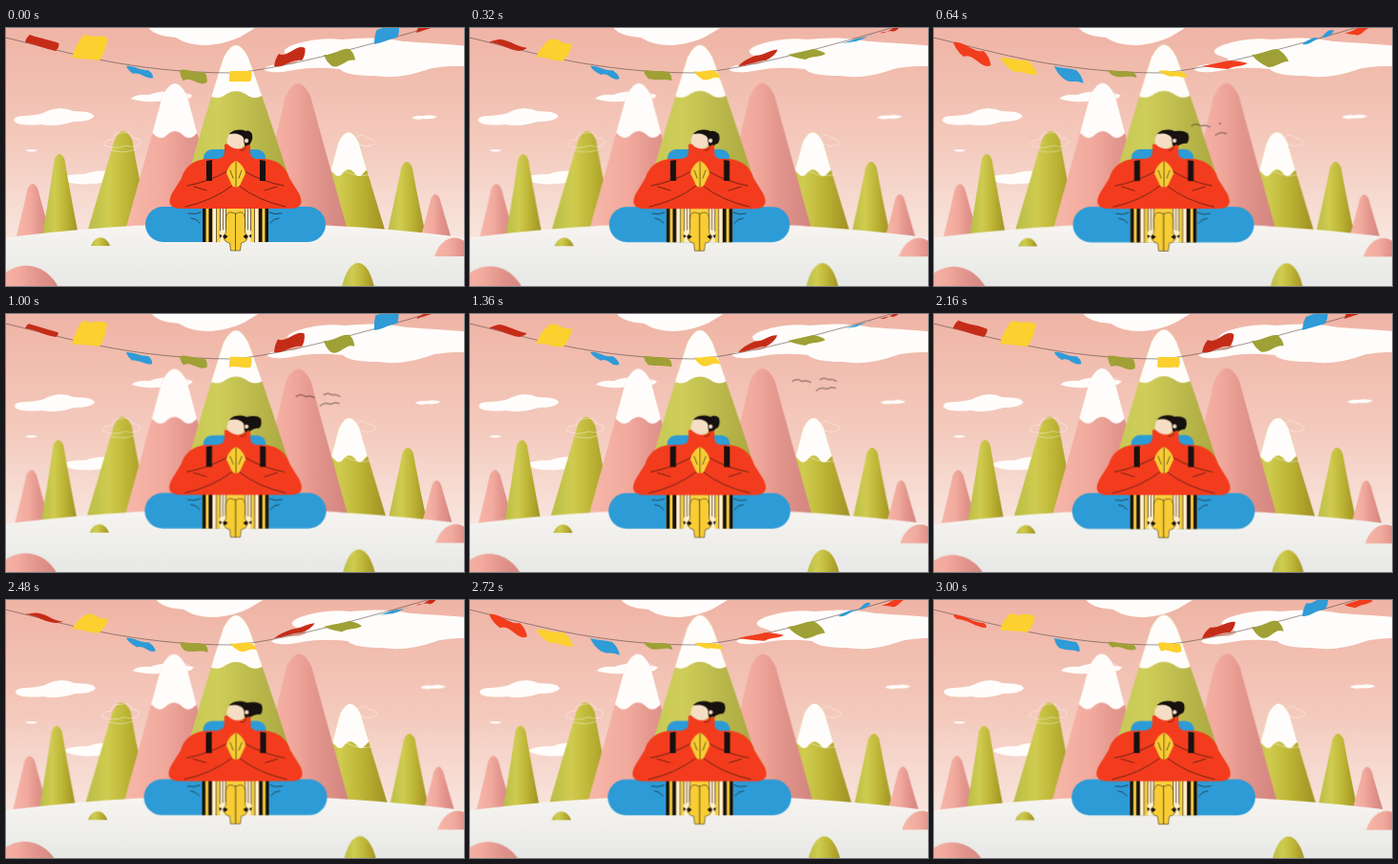
Animation, 480 px wide and 270 px high, one loop 3040 ms. Source, as an HTML page:

```html
<!DOCTYPE html>
<html lang="en">
<head>
<meta charset="utf-8">
<title>Mountain meditation</title>
<style>
  html, body { margin: 0; width: 100%; height: 100%; overflow: hidden; background: #f4cabd; }
  svg { display: block; width: 100vw; height: 100vh; }
  .zoom, .drift, .wind, .wind path { animation: 3040ms linear infinite both; }
  .zoom { animation-name: zoom; transform-origin: 240px 150px; }
  .drift { animation-name: drift; }
  .wind { animation-name: wind; }
  .wind path { animation-name: streak; animation-delay: var(--late, 0ms); }
  @keyframes zoom { to { transform: scale(1.019); } }
  @keyframes drift { to { transform: translate(var(--dx), var(--dy, 0px)); } }
  @keyframes wind {
    from { transform: translate(-128px, 60px); }
    to { transform: translate(159px, -75px); }
  }
  /* Each streak draws itself in, travels, then shortens towards its tip. */
  @keyframes streak {
    0%, 17% { stroke-dasharray: 0 2; stroke-dashoffset: 0; visibility: hidden; }
    17.1% { visibility: visible; }
    20.5%, 49% { stroke-dasharray: 1 2; stroke-dashoffset: 0; visibility: visible; }
    53.5% { stroke-dasharray: 1 2; stroke-dashoffset: -1; visibility: visible; }
    53.6%, 100% { stroke-dasharray: 0 2; stroke-dashoffset: 0; visibility: hidden; }
  }
  .ink { fill: none; stroke: #1b1413; stroke-width: .6; stroke-linecap: round; stroke-linejoin: round; }
  .wind { stroke-linecap: butt; }
  .mist { fill: none; stroke: #fff; stroke-width: .7; opacity: .6; }
  .cloud { fill: #fffdfb; }
</style>
</head>
<body>
<svg viewBox="0 0 480 270" preserveAspectRatio="none">
  <defs>
    <linearGradient id="sky" x2="0" y2="1">
      <stop stop-color="#efb4a5"/><stop offset=".45" stop-color="#f4cabd"/><stop offset=".8" stop-color="#f8e4dc"/>
    </linearGradient>
    <linearGradient id="green">
      <stop stop-color="#b9bd47"/><stop offset=".35" stop-color="#d0cc50"/>
      <stop offset=".65" stop-color="#bcb435"/><stop offset="1" stop-color="#a08f22"/>
    </linearGradient>
    <linearGradient id="pale">
      <stop stop-color="#c3c654"/><stop offset=".35" stop-color="#cfce5a"/>
      <stop offset=".65" stop-color="#b9b74a"/><stop offset="1" stop-color="#a3a03c"/>
    </linearGradient>
    <linearGradient id="pink">
      <stop stop-color="#f6b8a9"/><stop offset=".4" stop-color="#f2aa9e"/>
      <stop offset=".65" stop-color="#e3968d"/><stop offset="1" stop-color="#d2857f"/>
    </linearGradient>
    <linearGradient id="snow" x2="0" y2="1">
      <stop stop-color="#f8f5f2"/><stop offset=".35" stop-color="#f0efec"/><stop offset=".8" stop-color="#e6e8e5"/>
    </linearGradient>
  </defs>

  <rect width="480" height="270" fill="url(#sky)"/>

  <g class="cloud">
    <path class="drift" style="--dx:10px" d="M148-3Q152 8 178 10Q192 19 212 18Q232 16 246 9L266-3Z"/>
    <path class="drift" style="--dx:10px" d="M270 43Q276 37 298 38Q314 34 300 30Q283 25 300 18Q326 9 352 12Q388 8 416 14Q450 16 500 20V40Q452 39 440 44Q412 54 386 50Q356 50 350 43Q322 40 302 44Q276 49 270 43Z"/>
    <path class="drift" style="--dx:2px" d="M9 98Q6 92 20 92Q38 91 43 87Q57 81 70 87Q92 87 92 93Q88 98 71 98Q52 104 37 101Q14 103 9 98Z"/>
    <path class="drift" style="--dx:5px" d="M57 158Q60 153 82 153Q94 148 108 150V161Q70 167 57 158Z"/>
    <path class="drift" style="--dx:2px" d="M131 74Q136 69 150 70Q160 65 177 67L195 70Q192 77 171 76Q144 79 131 74Z"/>
    <path d="M20 128Q27 126 33 128Q27 131 20 128Z"/>
    <path class="drift" style="--dx:11px;--dy:-3px" d="M425 94Q430 91 437 92Q446 90 452 93Q447 96 438 95Q430 97 425 94Z"/>
  </g>

  <g class="zoom">
    <g id="range"></g>

    <g class="mist">
      <path d="M102 122Q104 116 112 117Q113 109 121 110Q132 107 133 115Q142 115 141 121Q136 126 126 123Q112 128 102 122M110 128Q123 132 135 127"/>
      <path d="M137 73Q150 79 164 75Q180 80 194 73Q196 69 187 68"/>
      <path d="M358 119Q359 113 367 115Q372 109 378 115Q387 116 386 121Q380 126 371 122Q361 125 358 119M341 151Q350 147 358 151Q370 157 382 153"/>
    </g>

    <path d="M-20 222Q240 186 500 222V290H-20Z" fill="url(#snow)"/>
    <g id="bushes"></g>

    <g id="hero">
      <rect x="207" y="127" width="65" height="28" rx="9" fill="#2d9bd6"/>
      <rect x="146" y="187" width="189" height="37" rx="18.5" fill="#2d9bd6"/>
      <g id="shorts"></g>
      <path d="M276 193Q282 196 289 194M277 204Q281 199 286 199M204 193Q198 196 191 194M203 204Q199 199 194 199" class="ink"/>

      <path id="hair" fill="#17110f"/>
      <ellipse cx="241" cy="118" rx="9.5" ry="9.5" fill="#f6dec5"/>
      <path d="M234 111Q240 104 250 109L255 118L251 125Q249 119 249 115Q245 109 234 111Z" fill="#17110f"/>
      <circle cx="252" cy="118" r="2.4" fill="#f6dec5" stroke="#1b1413" stroke-width=".5"/>
      <path d="M229 122Q232 120 235 124Q243 129 251 124Q254 121 256 123V130Q256 136 262 137L271 137C285 138 294 146 297 157L307 173Q315 189 297 189H184Q166 189 174 173L184 157C187 146 196 138 210 137L221 137Q229 136 229 130Z" fill="#f33c1d"/>
      <path d="M246 128Q250 129 251 125" class="ink"/>
      <path d="M210 139L216 138V160H210ZM266 138L272 139V160H266Z" fill="#17110f"/>
      <path d="M190 165Q212 161 232 150M188 187Q216 181 237 165M197 166L210 170M291 165Q269 161 250 150M293 187Q265 181 244 165M284 166L271 170" class="ink"/>
      <path d="M241 139C236 141 232 147 231 152L237 165Q241 168 245 165L251 152C250 147 246 141 241 139Z" fill="#f8cd34"/>
      <path d="M241 140V166M235 149L238 157M247 149L244 157" class="ink"/>
    </g>
  </g>

  <g class="wind ink">
    <path pathLength="1" d="M337 71Q343 67 347 71Q352 69 357 72"/>
    <path pathLength="1" style="--late:60ms" d="M362 81Q368 76 373 79Q378 76 383 78"/>
    <path pathLength="1" style="--late:110ms" d="M366 69Q371 66 375 69Q380 68 384 71"/>
  </g>

  <path d="M-5 9C60 24 130 47 238 47C290 43 380 18 455-4" class="ink" style="stroke:#5b4a47"/>
  <g id="flags"></g>
</svg>

<script>
const LOOP = 3040, GUST = 1060, SWAY = 1680;
const byId = id => document.getElementById(id);

function add(parent, tag, attrs) {
  const el = document.createElementNS('http://www.w3.org/2000/svg', tag);
  for (const key in attrs) el.setAttribute(key, attrs[key]);
  return parent.appendChild(el);
}

// Round-topped cone, with an optional scalloped snow cap of the given depth.
function mountain(left, right, x, top, base, fill, cap) {
  const h = base - top, r = Math.min(13, (right - left) * .14);
  const d = `M${left} ${base}Q${left + (x - left) * .48} ${top + h * .42} ${x - r} ${top + r}` +
    `Q${x} ${top - r} ${x + r} ${top + r}Q${right - (right - x) * .48} ${top + h * .42} ${right} ${base}Z`;
  const range = byId('range');
  add(range, 'path', { d, fill: `url(#${fill})` });
  if (!cap) return;
  const id = 'cone' + x, y = top + cap, w = (right - left) / 7;
  add(add(range, 'clipPath', { id }), 'path', { d });
  let edge = `M${x - 3.5 * w} ${top - 9}V${y}`;
  for (let i = 0; i < 7; i++) edge += `q${w / 2} ${i % 2 ? -6 : 8} ${w} 0`;
  add(range, 'path', { d: edge + `V${top - 9}Z`, fill: '#fffdfb', 'clip-path': `url(#${id})` });
}

mountain(10, 48, 28, 163, 221, 'pink');
mountain(38, 76, 56, 132, 217, 'green');
mountain(85, 152, 123, 108, 214, 'green');
mountain(125, 228, 177, 58, 212, 'pink', 53);
mountain(322, 398, 359, 109, 214, 'green', 42);
mountain(258, 358, 306, 58, 212, 'pink');
mountain(174, 314, 241, 18, 212, 'pale', 51);
mountain(399, 440, 420, 140, 217, 'green');
mountain(434, 467, 450, 174, 221, 'pink');

function bush(x, y, rx, h, fill, dx, dy) {
  add(byId('bushes'), 'path', {
    d: `M${x - rx} ${y}C${x - rx * .6} ${y - h * 1.3} ${x + rx * .6} ${y - h * 1.3} ${x + rx} ${y}Z`,
    fill: `url(#${fill})`, class: 'drift', style: `--dx:${dx}px;--dy:${dy}px`
  });
}
bush(99, 228, 10, 9, 'green', -1, 1);
bush(21, 276, 36, 28, 'pink', 2, 3);
bush(369, 276, 18, 31, 'green', 0, 0);
bush(470, 239, 21, 20, 'pink', 0, 0);

// Striped shorts, socks and feet, mirrored around the middle.
const shorts = byId('shorts');
add(shorts, 'rect', { x: 206, y: 187, width: 69, height: 37, fill: '#f8cf40' });
for (const side of [1, -1]) {
  const g = add(shorts, 'g', { transform: `translate(240.5 0) scale(${side} 1)` });
  const bar = (x, w, fill) => add(g, 'rect', { x, y: 187, width: w, height: 37, fill });
  bar(31, 3.5, '#17110f');
  bar(24, 4, '#17110f');
  bar(20, 4, '#fff0cf');
  bar(10, 6, '#fff0cf');
  add(g, 'path', { d: 'M10 188V210M13 188V211M16 188V212M20 188V224', class: 'ink' });
  add(g, 'path', { d: 'M1 194Q9 190 10 199V214L13 218Q12 224 6 225L5 233H0V194Z', fill: '#f8cd34', stroke: '#1b1413', 'stroke-width': .5 });
  add(g, 'path', { d: 'M8 218L11 216L13 218L11 221ZM14 217L17 216L16 220Z', fill: '#17110f' });
}

// Each flag: front and back colour, both tied corners, then four poses of the loose edge.
const RED = ['#f23d1d', '#c52c18'], GOLD = ['#fbd02f', '#fbd02f'];
const BLUE = ['#2f9bd7', '#2f9bd7'], MOSS = ['#9fa035', '#9fa035'];
const flags = [
  [RED, 20, 15, 52, 24, [[4, -8], [9, -3], [9, 15], [3, 4]]],
  [GOLD, 69, 31, 98, 34, [[10, -24], [11, -18], [12, 15], [9, -19]]],
  [BLUE, 126, 40, 149, 44, [[6, 8], [9, 9], [9, 14], [4, 10]]],
  [MOSS, 182, 44, 208, 46, [[3, 11], [4, 9], [5, 6], [4, 6]]],
  [GOLD, 235, 45, 257, 45, [[-1, 11], [6, 8], [11, 6], [2, 9]]],
  [RED, 281, 40, 310, 34, [[4, -13], [15, -11], [22, 3], [6, -12]]],
  [MOSS, 333, 28, 360, 22, [[7, 12], [15, 5], [14, 13], [7, 11]]],
  [BLUE, 386, 17, 410, 10, [[2, -15], [15, -3], [11, -7], [3, -14]]],
  [RED, 430, 5, 452, -2, [[3, -7], [9, -2], [9, 2], [9, 3]]]
].map(([sides, ax, ay, bx, by, poses]) => ({
  sides, ax, ay, bx, by, poses, el: add(byId('flags'), 'path', {})
}));
const KEYS = [0, .31, .595, .85, 1];

// Smooth periodic curve through the four poses.
function poseAt(poses, phase) {
  let i = 0;
  while (i < 3 && phase >= KEYS[i + 1]) i++;
  const u = (phase - KEYS[i]) / (KEYS[i + 1] - KEYS[i]);
  return [0, 1].map(k => {
    const [p, a, b, n] = [3, 4, 5, 6].map(s => poses[(i + s) % 4][k]);
    return a + u * (b - p + u * (2 * p - 5 * a + 4 * b - n + u * (3 * (a - b) + n - p))) / 2;
  });
}

function drawFlag(f, i, phase) {
  const [x, y] = poseAt(f.poses, phase);
  const { ax, ay, bx, by } = f;
  const lx = ax + x * 1.25, rx = bx + x * .85;
  const w = (bx - ax) / 3, wave = 5 * Math.sin(2 * Math.PI * phase + i * 1.3 + 1);
  f.el.setAttribute('fill', f.sides[y < 0 ? 1 : 0]);
  f.el.setAttribute('d',
    `M${ax} ${ay}Q${ax + x * .5 - 1} ${ay + y * .6} ${lx} ${ay + y}` +
    `C${lx + w} ${ay + y + wave} ${rx - w} ${by + y - wave} ${rx} ${by + y}` +
    `Q${bx + x * .5 + 2} ${by + y * .4} ${bx} ${by}` +
    `C${bx - w} ${by - wave * .5} ${ax + w} ${ay + wave * .5} ${ax} ${ay}Z`);
}

function drawHair(t) {
  const angle = 2 * Math.PI * t / SWAY;
  const tip = 262.5 - 5 * Math.cos(angle), y = 110 + Math.sin(angle);
  byId('hair').setAttribute('d',
    `M234 111Q242 104 252 108Q${tip - 4} ${y - 4} ${tip} ${y}` +
    `Q${tip + 2} ${y + 6} ${tip - 1} ${y + 10}Q257 ${y + 10} 253 126L246 116Z`);
}

function frame() {
  const t = performance.now() % LOOP;
  const phase = t % GUST / GUST;
  flags.forEach((f, i) => drawFlag(f, i, phase));
  drawHair(t);
  requestAnimationFrame(frame);
}
frame();
</script>
</body>
</html>
```
